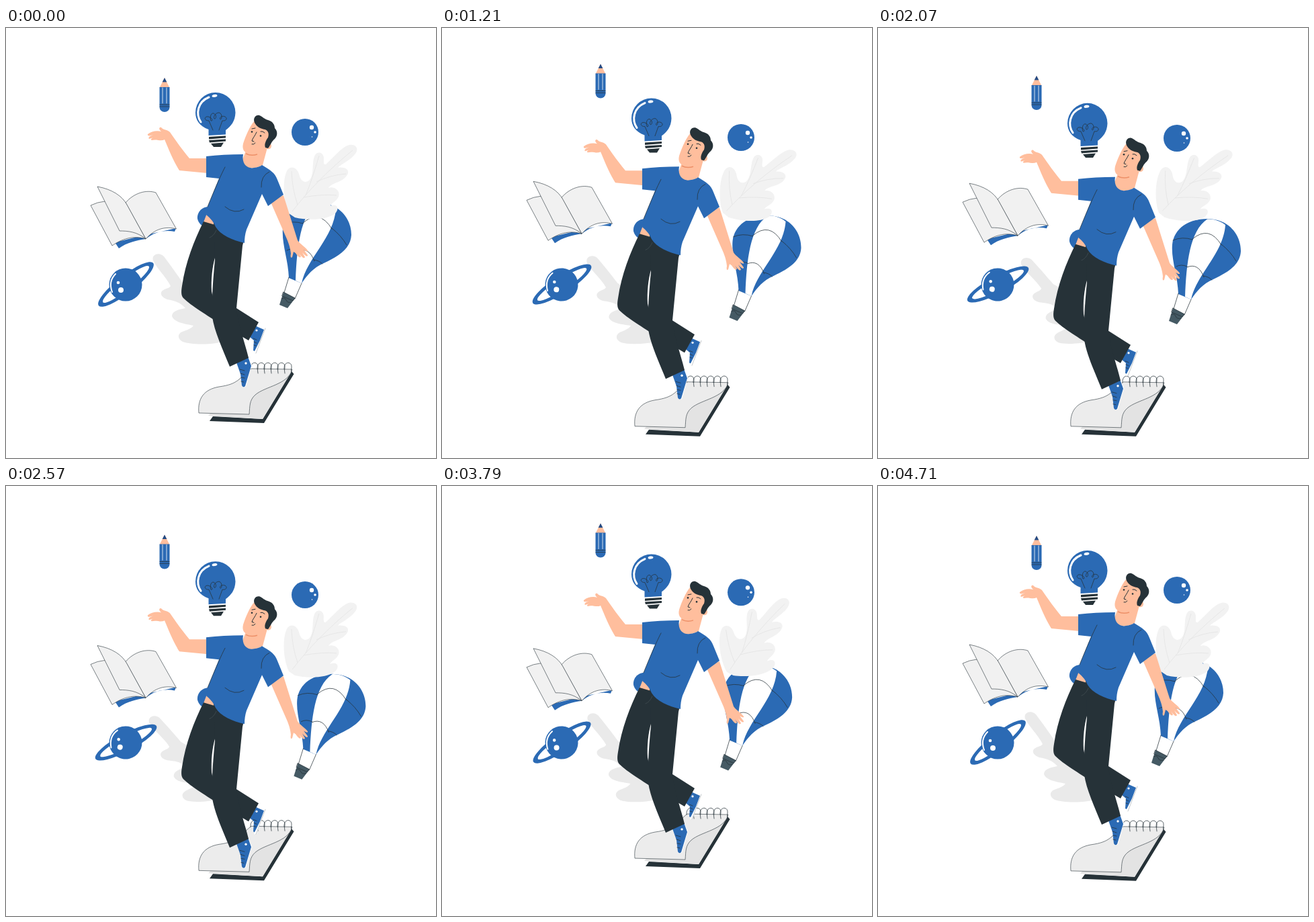
These frames come from a looping animation (640x640 px, 4.78 s). An HTML page:

```html
<!DOCTYPE html>
<html lang="en">
<head>
<meta charset="utf-8">
<title>Balancing ideas</title>
<style>
  html, body { margin: 0; width: 100%; height: 100%; overflow: hidden; background: #fff; }
  svg { display: block; width: 100vw; height: 100vh; }
  .blue { fill: #2b6ab4; }
  .dark { fill: #263238; }
  .skin { fill: #ffbe9d; }
  .white { fill: #fff; }
  .page { fill: #f1f1f1; }
  .line { fill: none; stroke: #263238; stroke-width: .75; stroke-linecap: round; stroke-linejoin: round; }
  .edge { stroke: #263238; stroke-width: .6; stroke-linejoin: round; }
  .shine { fill: none; stroke: #fff; stroke-linecap: round; }
  .vein { fill: none; stroke: #e4e4e4; stroke-width: .8; }
</style>
</head>
<body>
<svg viewBox="0 0 640 640">
  <g id="fern">
    <path fill="#eaeaea" d="M219 346C216 338 227 332 235 340C245 353 254 366 263 379L300 405L322 434C330 452 328 464 318 468C298 472 274 471 263 467C254 462 255 454 265 451C271 449 276 447 279 443C265 440 250 438 247 429C247 421 257 419 267 417C260 408 250 406 240 404C229 400 228 392 236 389C241 387 243 387 245 384C238 370 226 360 219 346Z"/>
  </g>

  <g id="balloon">
    <g transform="translate(-26 -24)">
      <path class="blue" d="M447 396C446 368 436 345 438 322C441 298 462 284 490 284C520 284 540 306 540 332C539 353 520 364 499 374C483 381 475 391 466 404Z"/>
      <path class="white" d="M490 284.500C464 302 459 350 457 400L466 404C474 366 514 336 517 293C509 287 500 284 490 284.500Z"/>
      <path class="line" d="M439 316Q453 310 468 315M468 314Q493 293 511 323M511 322Q525 333 533 347M444 355Q451 351 460 355M460 356Q477 349 485 371M484 369Q492 370 497 375"/>
      <path class="line" d="M447 395L440 418M466 404L456 427"/>
      <path fill="#455a64" d="M439 417L456.500 426L445 441L433 436Z"/>
      <path class="line" d="M439 417L456 426L453 430L437 423Z"/>
      <path class="line" d="M436 427Q441 424 443 429T451 432"/>
    </g>
  </g>

  <g id="leaf">
    <path fill="#f2f2f2" d="M421 276C412 258 411 224 419 211C425 204 433 208 436 217C438 227 444 232 451 227C460 218 454 200 460 189C464 183 472 185 473 193C473 199 472 204 476 203C488 192 500 177 511 174C520 172 526 179 520 187C513 197 498 203 494 208C506 206 513 212 507 220C500 230 485 230 480 238C489 235 498 242 495 251C492 258 485 260 482 265C493 261 497 268 490 276C476 287 447 286 430 282Z"/>
    <path class="vein" d="M426 273C449 243 480 211 516 182M446 249Q456 225 466 190M434 263Q426 240 425 213M462 229Q482 219 506 217M443 252Q470 247 492 249"/>
  </g>

  <g id="pad">
    <path class="dark" d="M308 578L382 582L425 511L428.500 515L384 588L303 585Z"/>
    <path fill="#e3e3e3" d="M301 577L382 582L426 510L364 508Z"/>
    <path fill="#ececec" class="edge" d="M287 573C285 552 294 538 317 534C346 530 346 522 365 507L426 508C420 531 386 533 371 546C362 554 363 563 362 575Z"/>
    <g id="rings" class="line"></g>
  </g>

  <g id="book">
    <path class="blue" d="M162 319L168 328C180 319 195 316 208 314C221 303 237 300 251 303L253 298L208 308Z"/>
    <path class="page edge" d="M126 264Q136 259 147 258L180 290L208 314C190 308 172 314 158 324Z"/>
    <path class="page edge" d="M178 260C190 246 208 240 223 245L253.500 299C238 295 222 298 208 314Z"/>
    <path class="page edge" d="M136 236C158 240 173 250 180 263L208 314C195 303 181 302 169 302L147 258Z"/>
  </g>

  <g id="planet">
    <path class="blue" fill-rule="evenodd" transform="rotate(-38 178.500 381.500)" d="M127 381.500a51.500 13 0 1 0 103 0a51.500 13 0 1 0-103 0ZM135 381.500a43.500 8 0 1 0 87 0a43.500 8 0 1 0-87 0Z"/>
    <circle class="blue" cx="178" cy="382" r="24.500"/>
    <path class="shine" stroke-width="2" d="M158 393Q152 377 163 366"/>
    <circle class="white" cx="167" cy="379" r="2.300"/>
    <circle class="white" cx="171" cy="390" r="4"/>
  </g>

  <g id="pencil">
    <path class="skin" d="M236 74L243.500 89H228.500Z"/>
    <path fill="#234b85" d="M236 74L239.300 80.500H232.700Z"/>
    <path class="blue" d="M228.500 88H243.500V118A7.500 7 0 0 1 228.500 118Z"/>
    <path class="shine" stroke-width=".8" d="M233 89V112M239 89V112"/>
    <path class="line" d="M229 114H243M229 117H243"/>
  </g>

  <g id="bulb">
    <path class="blue" d="M301.500 160V151C288 146 282 137 282 126A29.700 30 0 0 1 341.500 126C341 139 335 146 327 152V158.500Z"/>
    <path class="shine" stroke-width="3" d="M302 103C285 110 282 128 290 140"/>
    <ellipse class="white" cx="310.500" cy="101" rx="4" ry="2" transform="rotate(-8 310 101)"/>
    <path class="line" d="M308 152L302 138C294 138 295 131 301 132C308 134 308 139 305 138C303 133 305 126 309 127C314 129 313 136 310 135C308 132 312 126 317 126C322 127 322 136 319 136C317 133 322 130 326 132C330 134 328 139 322 138L317 152"/>
    <path class="dark" d="M302 162L327 160.500V163.500L302 165.500ZM302 167L327 165.500V168.500L303 170.500ZM305 172L324 170.500L320 177H309Z"/>
  </g>

  <g id="ball">
    <circle class="blue" cx="445" cy="155" r="20"/>
    <circle class="white" cx="455" cy="148" r="3.200"/>
    <circle class="white" cx="460" cy="155" r="1.800"/>
    <circle class="white" cx="455.500" cy="162" r=".8"/>
  </g>

  <g id="man">
    <path class="white" d="M380 444L386 447L373 484L369 484Z"/>
    <path class="blue" d="M366 441L384 449L378 465L370 481L368 480L369 465L363 460Z"/>
    <path class="line" style="stroke:#9aa3a8;stroke-width:.6" d="M386 447L372 484"/>
    <path class="line" d="M368 462L373 464M369 467L373 469M369 472L372 473"/>
    <circle class="white" cx="373" cy="450" r="1.600"/>
    <path class="white" d="M361 491L366 502L357 534L353 534Z"/>
    <path class="blue" d="M343 498L360 489L365 503L356 533Q353 536 351 532L349 515Z"/>
    <path class="line" d="M348 508L355 510M349 514L355 516M350 520L355 521M350 526L354 527"/>
    <circle class="white" cx="357" cy="499" r="1.700"/>

    <path class="blue" d="M304 266C290 265 284 276 285 284C287 292 292 295 298 296Z"/>
    <path class="skin" d="M299 276L294 289L314 294Z"/>
    <path class="dark" d="M294 288L328 298L311 342C307 355 305 375 306 392L309 406L343 417L376 438L361 465L320 441C300 428 275 413 264 402C260 398 261 390 262 384C267 349 280 316 294 288Z"/>
    <path class="dark" d="M309 289L354 316L352 324L343 417C345 440 355 466 361 491L333 504C322 477 310 451 307 430C306 405 308 375 311 345Z"/>
    <path class="line" style="stroke:#4a565c;stroke-width:.6" d="M313 301Q309 310 303 312"/>

    <path class="skin" d="M300 194H273C262 181 253 168 244 155C240 151 234 152 231 148C229 147 227 149 229 152L231 154C224 152 216 154 211 158C210 161 214 161 219 159C214 161 211 163 213 165L220 163C217 164 214 166 217 167C224 165 231 169 236 166C242 180 249 198 258 212L300 216Z"/>
    <path class="skin" d="M393 257L413 249L434 316C438 322 446 326 449 331C450 333 447 333 443 330L449 338C449 341 446 340 441 334L445 341C444 344 441 342 436 335L439 340C438 343 435 341 431 335L428 333L426 341C424 343 423 341 424 336C423 327 421 321 418 314Z"/>
    <path class="skin" d="M358 180L352 196C353 208 365 213 382 204L389 178Z"/>
    <path class="blue" d="M298 191Q323 188 353 188C350 205 362 210 369 208Q377 207 381 204C394 212 400 215 404 226L413 248L390 265L381 247L358 300Q355 309 355 320C337 316 319 308 312 296Q308 286 298 278L300 266L317 224L298 222Z"/>
    <path class="line" d="M326 207Q318 222 300 266M380 237Q379 220 392 214M326 266Q340 278 354 270"/>

    <path class="skin" d="M369 139C362 148 357 160 353 172C351 180 354 186 363 187C373 189 383 186 387 179C393 183 397 177 394 172L396 150Z"/>
    <path fill="none" stroke="#ed9068" stroke-width="1.500" d="M357 187Q365 191 374 188"/>
    <path class="dark" d="M370 141C367 134 372 129 377 130C382 132 385 136 390 137C397 139 400 144 400 149C405 154 404 161 400 165C395 169 394 174 390 179L386 178C384 173 387 167 390 163C392 157 390 152 385 151C379 150 373 147 370 141Z"/>
    <path class="line" style="stroke-width:1" d="M366 150L371 149M379 154Q382 153 385 156M373 155C371 160 367 164 366 168L369 169M366 173Q369 174 371 171"/>
    <circle class="dark" cx="366" cy="154.500" r="1.300"/>
    <circle class="dark" cx="379" cy="160.500" r="1.300"/>
  </g>
</svg>

<script>
const LOOP = 4780, STEP = 71.25, CYCLE = 4710;
const byId = id => document.getElementById(id);

byId('rings').innerHTML = Array.from({ length: 6 }, (_, i) =>
  `<path d="M${364 + i * 10} 508c-1-13 12-12 11-3q-1 5 0 9"/>`).join('');

// Smooth periodic curve through [time, value] points.
function curve(points) {
  const n = points.length;
  const at = i => {
    const [t, v] = points[(i + n) % n];
    return [t + Math.floor(i / n) * CYCLE, v];
  };
  const slope = i => {
    const [a, va] = at(i - 1), [b, vb] = at(i + 1);
    return (vb - va) / (b - a);
  };
  return t => {
    let i = n - 1;
    while (points[i][0] > t) i--;
    const [a, va] = at(i), [b, vb] = at(i + 1);
    const d = b - a, u = (t - a) / d, w = 1 - u;
    return va * w * w * (1 + 2 * u) + vb * u * u * (3 - 2 * u)
      + d * u * w * (slope(i) * w - slope(i + 1) * u);
  };
}

const wave = (t, n = 1) => (1 - Math.cos(2 * Math.PI * n * t / CYCLE)) / 2;
const sway = curve([[0, 0], [500, 5], [1210, 19.7], [1640, 25], [2070, 19.7], [2860, -12], [3430, -21], [3790, -18.7]]);
const glide = curve([[0, 0], [500, 5], [1210, 20.5], [1750, 27], [2070, 26], [3070, 16], [3790, 7]]);
const drop = curve([[0, 0], [500, 2], [1210, 8], [1700, 9.5], [2070, 9], [3070, 5], [3790, 3.3]]);
const flutter = curve([[0, 0], [500, -2], [1210, -7.7], [1600, -8.5], [2070, -4.8], [3070, 7.5], [3430, 8], [3790, 5.7]]);

const move = (x, y) => `translate(${x} ${y})`;
const turn = (deg, x, y) => `rotate(${deg} ${x} ${y})`;
const poses = {
  man: t => move(0, 35 * wave(t)),
  bulb: t => move(0, 16.5 * wave(t)),
  pencil: t => move(0, -20.5 * wave(t, 2)),
  ball: t => move(0, drop(t)),
  book: t => move(0, flutter(t)),
  pad: t => move(0, sway(t)),
  balloon: t => move(glide(t), glide(t) * .92),
  planet: t => turn(10 * wave(t), 178, 382),
  leaf: t => turn(sway(t) * .26, 432, 242),
  fern: t => turn(-6 * wave(t), 282, 404)
};
const parts = Object.entries(poses).map(([id, pose]) => [byId(id), pose]);

function draw(now) {
  const tick = Math.floor((now % LOOP + 5) / STEP);
  const t = tick * STEP % CYCLE;
  for (const [el, pose] of parts) el.setAttribute('transform', pose(t));
}

const start = performance.now();
function loop() {
  draw(performance.now() - start);
  requestAnimationFrame(loop);
}
loop();
</script>
</body>
</html>
```
